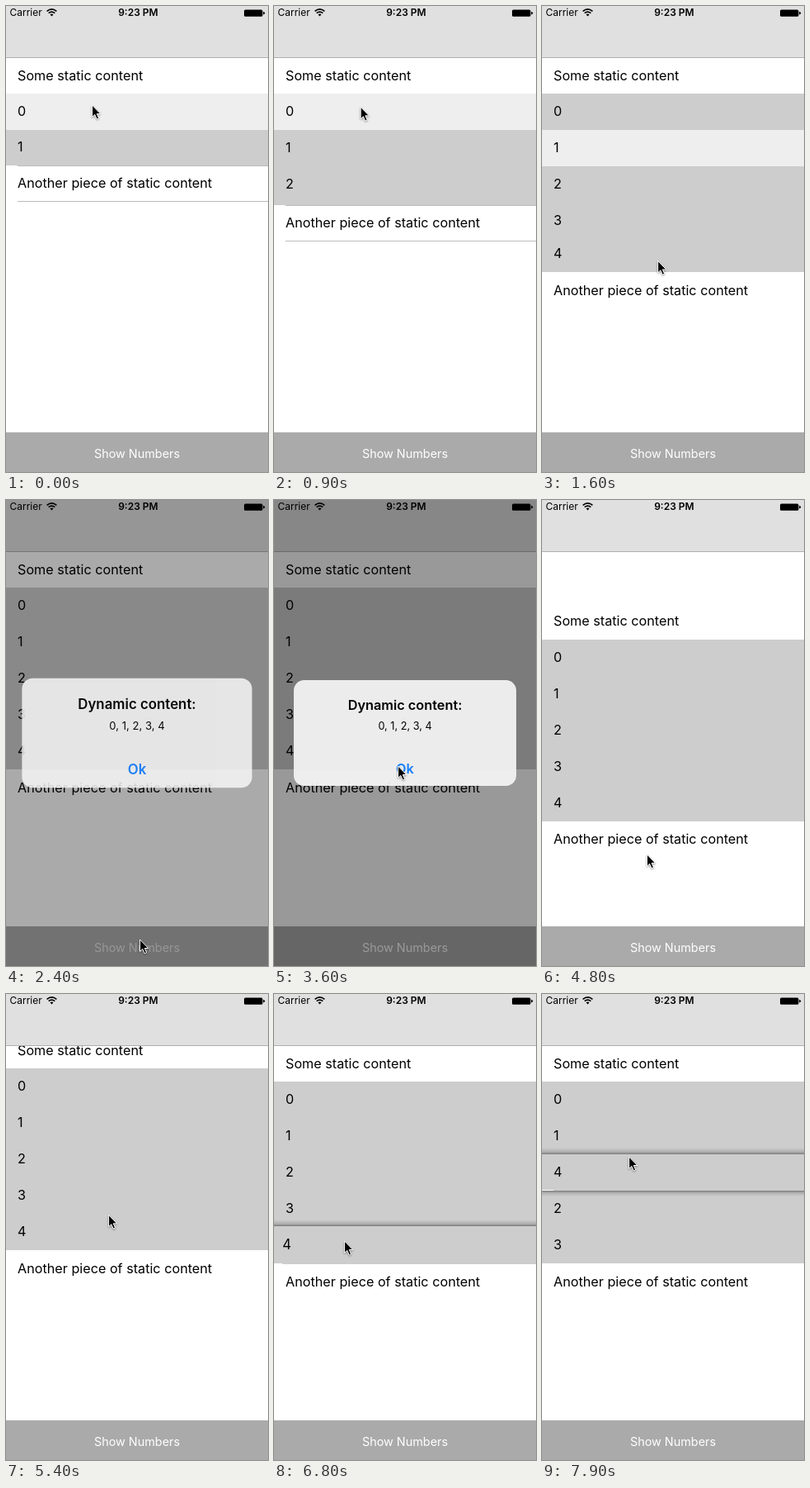
Write an HTML page that moves like this. It is 318x564 px and loops after 8 s.

```html
<!DOCTYPE html>
<html lang="en">
<head>
<meta charset="utf-8">
<title>Dynamic table rows</title>
<style>
  html, body { margin: 0; width: 100%; height: 100%; overflow: hidden; background: #fff; }
  svg { display: block; width: 100vw; height: 100vh; }
  text { font: 16.2px Inter, "Open Sans", sans-serif; fill: #000; }
  .mid { text-anchor: middle; }
  .status { font-size: 12px; }
  .bold { font-weight: 600; }
  #list { shape-rendering: crispEdges; }
  #cursor { filter: drop-shadow(0 1px 1px rgba(0, 0, 0, .4)); }
</style>
</head>
<body>
<svg viewBox="0 0 318 564">
  <defs>
    <linearGradient id="up" x1="0" y1="1" x2="0" y2="0">
      <stop offset="0" stop-opacity=".45"/>
      <stop offset=".4" stop-opacity=".15"/>
      <stop offset="1" stop-opacity="0"/>
    </linearGradient>
    <linearGradient id="down" x1="0" y1="0" x2="0" y2="1">
      <stop offset="0" stop-opacity=".45"/>
      <stop offset=".4" stop-opacity=".15"/>
      <stop offset="1" stop-opacity="0"/>
    </linearGradient>
  </defs>
  <rect width="318" height="564" fill="#fff"/>
  <g id="list">
    <text x="14" y="89.5">Some static content</text>
    <g id="rows"></g>
    <g id="tail">
      <rect width="318" height="44" fill="#fff"/>
      <text x="14" y="27.5">Another piece of static content</text>
      <path id="lines" d="M14 .5H318M14 43.5H318" stroke="#bcbbc0"/>
    </g>
    <g id="lifted">
      <rect id="shadeTop" y="-8" width="318" height="8" fill="url(#up)"/>
      <rect id="shadeBottom" y="44" width="318" height="7" fill="url(#down)"/>
      <rect width="318" height="44" fill="#cdcdcd"/>
      <rect y="43" width="14" height="1" fill="#fff"/>
      <text x="14" y="27">4</text>
    </g>
  </g>

  <rect width="318" height="62" fill="#e0e0e0"/>
  <rect y="62" width="318" height="1" fill="#b0b0b0"/>
  <text class="status" x="4.5" y="12.3">Carrier</text>
  <g fill="none" stroke="#000" stroke-width="1.6">
    <path d="M49.6 6.4Q55.5 1.2 61.4 6.4M51.7 8.7Q55.5 5.4 59.3 8.7"/>
    <path d="M55.5 12.4L53.5 10.3Q55.5 8.7 57.5 10.3Z" fill="#000" stroke="none"/>
  </g>
  <text class="status bold mid" x="160.4" y="12.3">9:23 PM</text>
  <rect x="289" y="4.4" width="22.4" height="8.4" rx="1.6" fill="#000"/>
  <path d="M312.2 6.8Q314.2 7.2 314.2 8.6T312.2 10.4Z"/>

  <rect y="516" width="318" height="48" fill="#aaa"/>
  <text id="button" class="mid" x="159" y="546.5" style="font-size:14.4px;fill:#fff">Show Numbers</text>

  <rect id="dim" width="318" height="564"/>
  <g id="alert">
    <rect x="-135" y="-64" width="270" height="128" rx="12.5" fill="#f6f6f6" fill-opacity=".92"/>
    <text class="mid bold" y="-28.5" style="font-size:16.3px">Dynamic content:</text>
    <text class="mid" y="-4" style="font-size:12.7px">0, 1, 2, 3, 4</text>
    <text class="mid bold" y="48.5" style="font-size:16.3px;fill:#157efb">Ok</text>
  </g>
  <path id="cursor" d="M.6 0V14.4L3.8 11.4L6.2 16.8L8.6 15.7L6.3 10.5H10.8Z" stroke="#fff" stroke-width="1"/>
</svg>
<script>
const LOOP = 8000, ROW = 44, TOP = 106, VIEW = 454;
const ids = 'rows list tail lines lifted shadeTop shadeBottom button dim alert cursor'.split(' ');
const el = Object.fromEntries(ids.map(id => [id, document.getElementById(id)]));

const clamp = v => Math.max(0, Math.min(1, v));
const span = (t, start, length) => clamp((t - start) / length);
const smooth = p => p * p * (3 - 2 * p);
const easeOut = p => 1 - (1 - p) ** 3;
const set = (node, name, value) => node.setAttribute(name, value);
const move = (node, x, y) => set(node, 'transform', `translate(${x} ${y})`);

// Each tap adds one row: start time and tapped row
const taps = [[-285, 0], [300, 0], [850, 0], [1340, 1]];

// Pointer path: time, x, y
const path = [
  [0, 104, 120], [850, 104, 120], [1200, 114, 160], [1340, 114, 160],
  [1600, 140, 308], [2200, 162, 532], [2800, 162, 532], [3400, 150, 322],
  [3600, 150, 322], [3800, 138, 332], [4300, 128, 297], [4600, 128, 297],
  [4900, 126, 474], [5180, 124, 250], [5320, 124, 250], [5400, 124, 267],
  [5700, 118, 475], [6080, 85, 299], [6800, 85, 299], [7600, 105, 197], [LOOP, 105, 197]
];
const PRESS = 4600, RELEASE = 5700, GRIP = 297;

// Monotone cubic through the keys
function track(keys, t, c) {
  const slope = i => i < 0 || i > keys.length - 2 ? 0 :
    (keys[i + 1][c] - keys[i][c]) / (keys[i + 1][0] - keys[i][0]);
  const tangent = i => {
    const a = slope(i - 1), b = slope(i);
    return a * b > 0 ? 2 * a * b / (a + b) : 0;
  };
  let i = 0;
  while (i < keys.length - 2 && t >= keys[i + 1][0]) i++;
  const h = keys[i + 1][0] - keys[i][0], p = (t - keys[i][0]) / h, q = 1 - p;
  return keys[i][c] * q * q * (1 + 2 * p) + keys[i + 1][c] * p * p * (3 - 2 * p)
    + h * p * q * (tangent(i) * q - tangent(i + 1) * p);
}

const rubber = d => Math.sign(d) * VIEW * (1 - 1 / (Math.abs(d) * 0.55 / VIEW + 1));

function scroll(t, y) {
  if (t < PRESS) return 0;
  if (t < RELEASE) return rubber(y - GRIP);
  return rubber(475 - GRIP) * (1 - easeOut(span(t, RELEASE, 380)));
}

function makeRow(i) {
  const g = document.createElementNS('http://www.w3.org/2000/svg', 'g');
  g.innerHTML = `<rect width="318" height="44" fill="#cdcdcd"/>
    <rect width="318" height="44" fill="#eee"/><text x="14" y="27">${i}</text>`;
  el.rows.prepend(g);
  return { g, glow: g.children[1] };
}
const rows = [0, 1, 2, 3, 4].map(makeRow);

function drawRows(t) {
  const grown = taps.map(([start]) => smooth(span(t, start, 320)));
  const glow = [0, 0, 0, 0, 0];
  taps.forEach(([start, row]) => {
    if (t >= start) glow[row] = Math.max(glow[row], 1 - span(t, start + 285, 130));
  });
  const shift = [0, 0, smooth(span(t, 7360, 200)), smooth(span(t, 7090, 200)), 0];
  rows.forEach(({ g, glow: light }, i) => {
    const shown = i ? grown[i - 1] : 1;
    move(g, 0, TOP + ROW * (i - 1 + shown + shift[i]));
    set(light, 'opacity', glow[i]);
    set(g, 'visibility', shown > 0 && !(i === 4 && t >= 6720) ? 'visible' : 'hidden');
  });
  move(el.tail, 0, TOP + ROW * (1 + grown.reduce((a, b) => a + b)));
  set(el.lines, 'opacity', t < 1340 ? 1 : 0);
}

function drawLifted(t, y) {
  const on = t >= 6720, moved = clamp((299 - y) / 102);
  set(el.lifted, 'visibility', on ? 'visible' : 'hidden');
  if (!on) return;
  const scale = 1 + 0.025 * span(t, 6720, 80) * (1 - smooth(span(t, 6800, 220)));
  const top = 282 - 88 * moved;
  set(el.lifted, 'transform', `translate(159 ${top + 22}) scale(${scale}) translate(-159 -22)`);
  const shade = 1 - 0.12 * span(t, 7620, 300);
  set(el.shadeTop, 'opacity', shade * span(t, 6700, 100));
  set(el.shadeBottom, 'opacity', shade * clamp(moved * 6));
}

function draw(t) {
  const x = track(path, t, 1), y = track(path, t, 2);
  move(el.cursor, x, y);
  move(el.list, 0, scroll(t, y));
  drawRows(t);
  drawLifted(t, y);

  const shown = easeOut(span(t, 2205, 440));
  const left = 1 - easeOut(span(t, 3610, 285));
  set(el.dim, 'opacity', 0.4 * shown * left);
  set(el.alert, 'opacity', shown ** 0.4 * left);
  set(el.alert, 'transform', `translate(159 282) scale(${1.2 - 0.2 * shown})`);
  set(el.button, 'opacity', t > 2200 && t < 2650 ? 0.65 + 0.35 * span(t, 2450, 200) : 1);
}

function tick() {
  draw(performance.now() % LOOP);
  requestAnimationFrame(tick);
}
tick();
</script>
</body>
</html>
```
